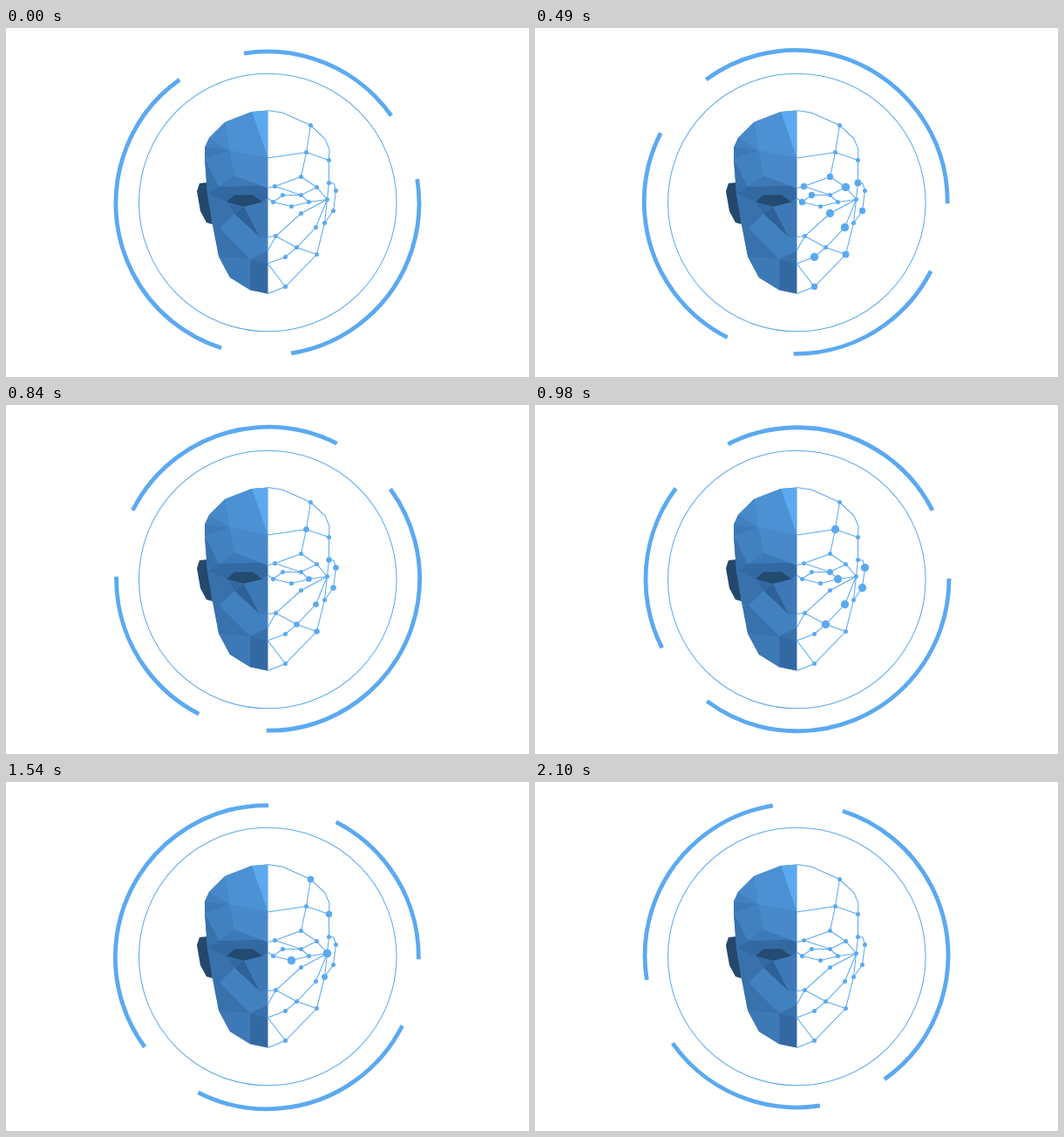
Write an HTML page that moves like this. It is 600 px wide and 400 px high and loops after 2170 ms.

```html
<!DOCTYPE html>
<html lang="en">
<head>
<meta charset="utf-8">
<title>Face scan</title>
<style>
  html, body { margin: 0; width: 100%; height: 100%; overflow: hidden; background: #fff; }
  svg { display: block; width: 600px; height: 400px; }
  .line { fill: none; stroke: #5ba9f1; stroke-width: 1.05; }
</style>
</head>
<body>
<svg viewBox="0 0 600 400">
  <circle class="line" cx="300.3" cy="200" r="147.8"/>
  <g id="ring">
    <!-- slightly off-centre, so the ring wobbles as it turns -->
    <circle class="line" style="stroke-width:4.8" cx="300" cy="199" r="174" pathLength="360"
      stroke-dasharray="126.9 26.5 63.7 26 90.2 26.7" transform="rotate(-75 300 199)"/>
  </g>
  <path fill="#24486b" d="M231 177L222 178L219 187L223 210L230 223L237 225Z"/>
  <g id="solid"></g>
  <g id="wire" class="line"></g>
  <g id="dots" fill="#5ba9f1"></g>
</svg>
<script>
  const LOOP = 2170, STEP = 70, HALF = 340, MID = 300.3;
  const $ = id => document.getElementById(id);

  // Lower case: landmarks of the right half, mirrored for the left half.
  const marks = {
    a: [349, 111], b: [344, 142], c: [370, 151], d: [338, 170], e: [370, 177], f: [378, 186],
    g: [308, 181], h: [356, 182], i: [317, 191], j: [338, 191], k: [347, 199], l: [306, 199],
    m: [327, 204], n: [368, 196], o: [375, 209], p: [365, 223], q: [338, 212], r: [355, 228],
    s: [309, 238], t: [333, 251], u: [356, 259], v: [320, 262], w: [320, 296]
  };
  for (const k in marks) marks[k] = marks[k].map(n => n + 0.5);

  // Upper case: corners without a dot; A to H run down the middle.
  const corners = {
    I: [282, 96], J: [233, 126], K: [228, 137], L: [228, 150], M: [231, 190], N: [237, 225],
    O: [257, 286], P: [317, 97], Q: [366, 127], R: [371, 139], S: [376, 178]
  };
  [94.5, 149, 183.5, 195, 239.5, 255, 270, 304.5].forEach((y, i) => corners['ABCDEFGH'[i]] = [MID, y]);

  const right = k => marks[k] || corners[k];
  // The solid half is a little taller than the wire half.
  const left = k => corners[k] || [2 * MID - marks[k][0], 200 + (marks[k][1] - 200) * 1.04];

  function add(parent, tag, attrs) {
    const el = document.createElementNS('http://www.w3.org/2000/svg', tag);
    for (const k in attrs) el.setAttribute(k, attrs[k]);
    return $(parent).appendChild(el);
  }
  const points = (names, place) => [...names].map(place).join(' ');
  const facet = (names, fill) => add('solid', 'polygon', { points: points(names, left), fill });

  // Facets by shade, 0 dark to 9 light.
  const shades = {
    0: 'mqs', 1: 'MhgCDlijk kmq vGHw', 2: 'LhM MkqrN rvu Nru vFG',
    3: 'KbL dCgh Ovw mlDEs uvO', 4: 'JbK Lbdh qsvr sEFv', 5: 'abJ BCdb', 6: 'IBba', 9: 'IAB'
  };
  facet('AIaJKLMNuOwH', '#3c7cbd');
  for (const s in shades)
    for (const names of shades[s].split(' '))
      facet(names, `rgb(${46 + 5 * s} ${97 + 8 * s} ${153 + 9.7 * s})`);
  facet('kjilm', '#234a71');

  for (const names of 'APaQRcenpuwH abdgC Bbc dhnqsF gjh Dlijk lmkn eSfop Estu nrtvGw'.split(' '))
    add('wire', 'polyline', { points: points(names, right) });

  // Time (ms) at which each group of dots is largest
  const waves = {
    320: 'dgilow', 440: 'q', 520: 'hrv', 630: 'eu', 1040: 'bfkort',
    1170: 'j', 1350: 'p', 1545: 'mn', 1700: 'ac'
  };
  const dots = Object.entries(marks).map(([k, [cx, cy]]) => ({
    el: add('dots', 'circle', { cx, cy }),
    peaks: Object.keys(waves).filter(t => waves[t].includes(k))
  }));

  const swell = d => Math.abs(d) < HALF ? Math.cos(d / HALF * Math.PI / 2) ** 2 : 0;

  function draw(now) {
    const step = Math.floor(now % LOOP / STEP), t = step * STEP;
    $('ring').setAttribute('transform', `rotate(${182.7 + 18 * step} 300 200)`);
    for (const { el, peaks } of dots)
      el.setAttribute('r', 2.5 + 2.3 * Math.max(0, ...peaks.map(p => swell(t - p))));
  }

  const start = performance.now();
  function tick() {
    draw(performance.now() - start);
    requestAnimationFrame(tick);
  }
  tick();
</script>
</body>
</html>
```
